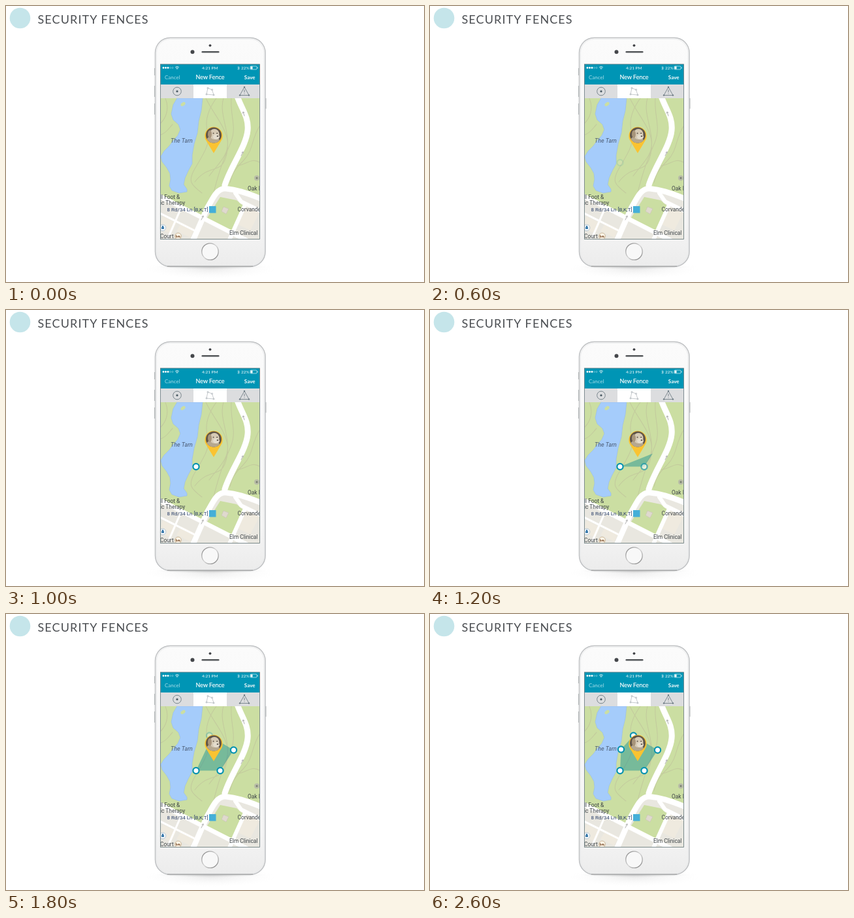
Write an HTML page that moves like this. It is 640 px wide and 422 px high and loops after 3.1 s.

```html
<!DOCTYPE html>
<html lang="en">
<head>
<meta charset="utf-8">
<title>Security fences</title>
<style>
  html, body { margin: 0; width: 100%; height: 100%; overflow: hidden; background: #fff; }
  svg { display: block; width: 640px; height: 422px; font-family: Lato, sans-serif; }
  .line { fill: none; stroke-linecap: round; stroke-linejoin: round; }
  .label { font: 8.4px Roboto, sans-serif; fill: #3d4347; }
  .station { font-size: 8px; fill: #2c4069; }
  .water { font-size: 9px; font-style: italic; fill: #4a5a72; }
</style>
</head>
<body>
<svg viewBox="0 0 640 422">
  <defs>
    <clipPath id="screen"><rect x="236.500" y="89" width="152" height="267.500"/></clipPath>
    <clipPath id="portrait"><circle cx="318" cy="197.500" r="12"/></clipPath>
    <radialGradient id="shadow"><stop stop-color="#888" stop-opacity=".45"/><stop offset="1" stop-color="#ddd" stop-opacity="0"/></radialGradient>
    <linearGradient id="shell" x2="0" y2="1"><stop stop-color="#fbfbfb"/><stop offset=".8" stop-color="#f5f5f5"/><stop offset="1" stop-color="#ececec"/></linearGradient>
    <linearGradient id="ring" x2="1" y2="1"><stop stop-color="#777"/><stop offset=".5" stop-color="#d4d4d4"/><stop offset="1" stop-color="#777"/></linearGradient>
  </defs>

  <circle cx="21.500" cy="18.500" r="15.800" fill="#c5e5ea"/>
  <text x="48.500" y="27" font-size="18" letter-spacing="1.1" fill="#4b4e52">SECURITY FENCES</text>

  <!-- Phone -->
  <ellipse cx="313" cy="402" rx="100" ry="15" fill="url(#shadow)" opacity=".35"/>
  <ellipse cx="313" cy="399" rx="86" ry="4" fill="url(#shadow)"/>
  <path d="M228 95v11M228 122v17M228 149v17M397.500 141v16" stroke="#b5b8ba" stroke-width="2"/>
  <rect x="228.500" y="48.500" width="168.500" height="350" rx="23" fill="url(#shell)" stroke="#bfc1c3" stroke-width="1.500"/>
  <path d="M247 398h131" stroke="#999"/>
  <rect x="230.500" y="50.500" width="164.500" height="346" rx="21" fill="none" stroke="#e9eaeb"/>
  <circle cx="285.500" cy="70.300" r="3" fill="#45474b"/>
  <circle cx="312.500" cy="60.300" r="1.900" fill="#45474b"/>
  <rect x="299.500" y="69" width="27" height="2.600" rx="1.300" fill="#55585b"/>
  <circle cx="312.500" cy="375.500" r="12.700" fill="#f8f8f8" stroke="url(#ring)" stroke-width="1.200"/>

  <g clip-path="url(#screen)">
    <!-- Map -->
    <rect x="236" y="140" width="153" height="217" fill="#cbdea2"/>
    <path d="M236 291L303 325 318 290 334 278 389 295V358H236Z" fill="#e9e7e0"/>
    <path d="M240 322l21 10-8 16-20-8zM269 331l20 10-7 13-21-10zM367 307l21 9-14 27-19-9z" fill="#efeadf"/>
    <path class="line" stroke="#c3cb9d" stroke-width="1.100"
      d="M322 141C309 159 304 178 309 194S300 230 289 249 283 273 300 286M306 141C318 166 336 184 339 206S324 242 311 260M345 141C343 169 354 185 344 209S328 246 318 285M333 141C325 166 345 192 338 226S312 239 289 269M388 184C375 205 379 221 363 237S346 258 343 270M388 239C376 231 366 244 354 244M244 141C251 158 244 172 237 179M237 197C247 193 249 187 255 181"/>
    <path d="M262 141L256 151 253 165 256 174 264 181 267 189 263 198 256 206 250 214 242 222 237 230 239 238 246 247 251 256 252 265 250 275 254 282 265 286 277 284 277 280 272 273 274 263 279 252 285 241 285 228 288 211 293 194 295 176 299 160 301 141Z" fill="#a5ccfb" stroke="#94bbed" stroke-width=".6" stroke-linejoin="round"/>
    <ellipse cx="271" cy="150" rx="4" ry="2.500" transform="rotate(-35 271 150)" fill="#cbdea2"/>
    <path d="M328 292L353 297 364 306 345 345 306 327Z" fill="#cbdea2"/>
    <g class="line" stroke="#fff">
      <path stroke-width="9" d="M354 138C361 158 372 170 370 190C368 214 344 245 335 274"/>
      <path stroke-width="8.500" d="M389 294C366 285 354 281 335 279C322 280 317 294 308 309L286 359"/>
      <path stroke-width="7" d="M234 290L303 325 368 358"/>
      <path stroke-width="6" d="M351 286L360 299 389 313M366 304L347 346 342 358"/>
      <path stroke-width="3" d="M268 309L247 357M234 316L288 343"/>
    </g>
    <path d="M333 307l8 3-4 8-7-4z" fill="#dfd9ce" stroke="#c8c3b2" stroke-width=".6"/>
    <path class="line" stroke="#a9a9a9" stroke-width=".9" d="M360 229l3-6m-2 1l2-1 0 2M365 168l-2-6m-1 2l1-2 2 1M299 327l3-6m-2 1l2-1 0 2"/>

    <g class="label">
      <text class="water" x="252" y="208.500">The Tarn</text>
      <text x="236" y="295">ll Foot &amp;</text>
      <text x="236" y="304">ic Therapy</text>
      <text class="station" x="246.500" y="314">8 Rd/34 Ln [B,K,T]</text>
      <text x="370" y="282">Oak I</text>
      <text x="354.500" y="314">Corvandel</text>
      <text x="342" y="350">Elm Clinical</text>
      <text x="236" y="355">Court</text>
    </g>
    <rect x="311" y="306" width="10.500" height="10.500" fill="#45afd8"/>
    <circle cx="240" cy="339" r="4.800" fill="#f8fafc" stroke="#b4c5d2"/>
    <path d="M238 338h4v3h-4zM238.800 338v-2h2.400v2" fill="#3c7cad"/>
    <circle cx="263.500" cy="352" r="5" fill="#fff5e7" stroke="#c9b798"/>
    <path d="M260.500 350v4m0-1h6v1m-4-2h4" fill="none" stroke="#7e5634"/>
    <circle cx="384" cy="263" r="4" fill="#b8bca7"/>
    <circle cx="384" cy="263" r="1.500" fill="#777d70"/>

    <path id="fence" fill="#158e91" fill-opacity=".46"/>
    <g id="dots" fill="#fff" stroke="#0793b0" stroke-width="2.200"></g>

    <!-- Pet pin -->
    <path d="M318 225L306.500 206A13.700 13.700 0 1 1 329.500 206Z" fill="#fac331"/>
    <g clip-path="url(#portrait)">
      <rect x="305" y="185" width="26" height="26" fill="#605548"/>
      <path d="M305 205l8-7 13 5 4 9h-25z" fill="#b5a78f"/>
      <ellipse cx="319" cy="196" rx="7.500" ry="8" fill="#d6cab5"/>
      <ellipse cx="312" cy="196" rx="3" ry="6" fill="#a8957b"/>
      <ellipse cx="322" cy="200" rx="5" ry="4" fill="#e4dccd"/>
      <path d="M317.500 194.500h.1m5.500 0h.1M323.500 199h1" stroke="#403730" stroke-width="1.700" stroke-linecap="round"/>
    </g>

    <!-- App bars -->
    <rect x="236" y="89" width="153" height="31" fill="#0095b5"/>
    <g fill="#fff" font-size="6.500">
      <circle cx="241" cy="94.500" r="1.400"/><circle cx="244.500" cy="94.500" r="1.400"/><circle cx="248" cy="94.500" r="1.400"/>
      <g fill="none" stroke="#fff" stroke-width=".5" opacity=".7"><circle cx="251.500" cy="94.500" r="1.100"/><circle cx="255" cy="94.500" r="1.100"/></g>
      <path class="line" stroke="#fff" stroke-width=".9" d="M259.500 93.500q2.500-2 5 0M260.700 95.200q1.300-1 2.600 0M262 96.500v0"/>
      <text x="312.300" y="97" text-anchor="middle">4:21 PM</text>
      <text x="360" y="97">22%</text>
      <path d="M354.500 93l3 3-1.500 1.500v-5l1.500 1.500-3 3" fill="none" stroke="#fff" stroke-width=".5"/>
      <rect x="374" y="92" width="10" height="5" rx="1" fill="none" stroke="#fff" stroke-width=".6"/>
      <path d="M374.500 92.500h3v4h-3zM384.800 93.500h.8v2h-.8z"/>
      <text x="243" y="112" font-size="8" fill="#a5dce8">Cancel</text>
      <text x="312.500" y="112.300" font-size="9" text-anchor="middle" stroke="#fff" stroke-width=".15">New Fence</text>
      <text x="381.500" y="112" font-size="8" font-weight="700" text-anchor="end">Save</text>
    </g>
    <rect x="236" y="120" width="153" height="21" fill="#dcdddf"/>
    <rect x="287" y="120" width="51" height="21" fill="#fff"/>
    <g fill="none" stroke="#63717a" stroke-width=".8">
      <circle cx="262" cy="130.500" r="6.300"/><circle cx="262" cy="130.500" r="1.300" fill="#3c4c55"/>
      <path d="M365 124L358 136.500H372ZM365 128v4m0 1.500v1"/>
      <g fill="#63717a"><circle cx="365" cy="124" r=".8"/><circle cx="358" cy="136.500" r=".8"/><circle cx="372" cy="136.500" r=".8"/></g>
      <path d="M309 125.500L315.500 128 318 136 307 135Z" stroke="#b8bdc0"/>
      <g fill="#fff" stroke="#a5adb1"><circle cx="309" cy="125.500" r="1"/><circle cx="315.500" cy="128" r="1"/><circle cx="318" cy="136" r="1"/><circle cx="307" cy="135" r="1"/></g>
    </g>
  </g>
  <rect x="236.500" y="89" width="152" height="267.500" fill="none" stroke="#64767c" stroke-width=".8"/>
</svg>
<script>
  const LOOP = 3100, STEP = 200, LAST = 2600;
  const corners = [
    { x: 291, y: 239.5, start: 375 },
    { x: 328, y: 239.5, start: 850 },
    { x: 348.5, y: 208, start: 1010 },
    { x: 311.5, y: 186, start: 1530 },
    { x: 292.5, y: 207, start: 1930 }
  ];
  const fence = document.getElementById("fence");
  const dotLayer = document.getElementById("dots");
  const clamp = v => Math.max(0, Math.min(1, v));

  for (const corner of corners) {
    corner.dot = document.createElementNS("http://www.w3.org/2000/svg", "circle");
    corner.dot.setAttribute("cx", corner.x);
    corner.dot.setAttribute("cy", corner.y);
    corner.dot.setAttribute("r", 4.6);
    dotLayer.append(corner.dot);
  }

  // Each corner slides out of the previous one, then its handle fades in.
  function draw(time) {
    const points = corners.map((corner, i) => {
      const from = corners[i - 1] || corner;
      const slide = clamp((time - corner.start) / 300);
      corner.dot.setAttribute("opacity", clamp((time - corner.start - 200) / 250));
      return slide > 0 && [from.x + (corner.x - from.x) * slide, from.y + (corner.y - from.y) * slide];
    }).filter(Boolean);
    fence.setAttribute("d", points.length > 1 ? `M${points.join("L")}Z` : "");
  }

  function tick() {
    const time = performance.now() % LOOP;
    draw(Math.min(LAST, Math.floor(time / STEP) * STEP));
    requestAnimationFrame(tick);
  }
  tick();
</script>
</body>
</html>
```
